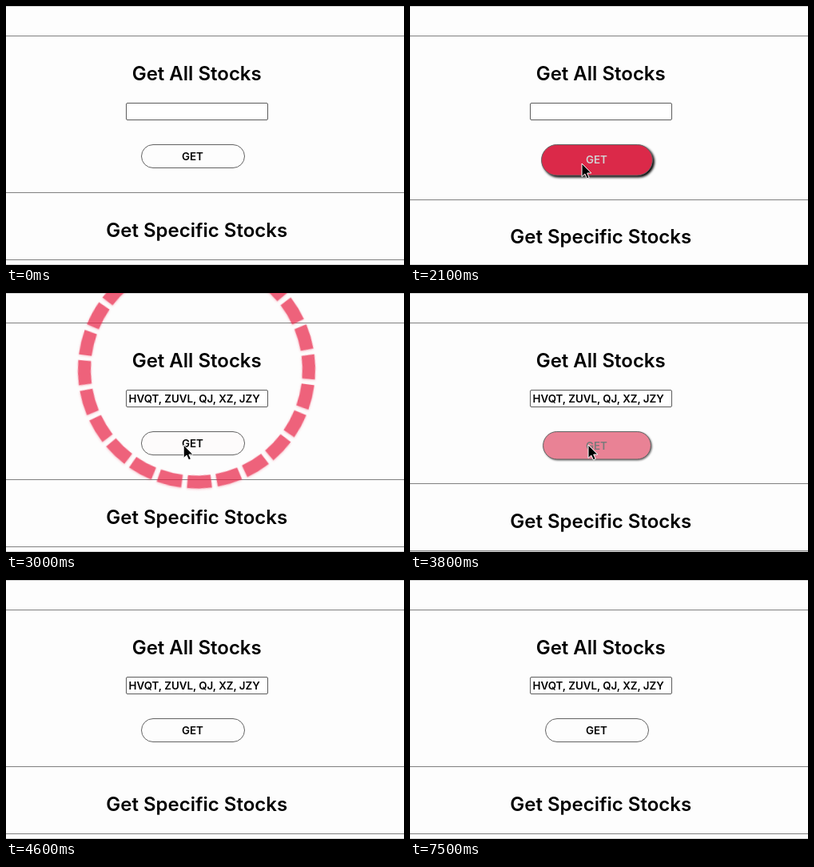
These frames come from a looping animation (498 px wide and 324 px high, 8 s). An HTML page:

```html
<!DOCTYPE html>
<html lang="en">
<head>
<meta charset="utf-8">
<title>Get stocks</title>
<style>
  html, body { margin: 0; width: 100%; height: 100%; overflow: hidden; background: #fdfdfd; }
  svg { display: block; width: 498px; height: 324px; --p: 0; }
  text { font: 600 13.33px Inter, "Open Sans", sans-serif; }
  .title { font-size: 24px; text-anchor: middle; }
  .edge { fill: #d2d2d2; }
  .rule { fill: #808080; shape-rendering: crispEdges; }
  .field { fill: #fff; stroke: #5c5c5c; }
  .below { transform: translateY(calc(var(--p) * 9px)); }
  .button {
    x: calc(169.5px - var(--p) * 5px);
    y: 173.5px;
    width: calc(129px + var(--p) * 10px);
    height: calc(29px + var(--p) * 9.5px);
    rx: calc(14.5px + var(--p) * 4.75px);
    stroke: #626262;
    fill: color-mix(in srgb, #db2848 calc(var(--p) * 100%), #fdfdfd);
    filter: drop-shadow(calc(var(--p) * 3px) calc(var(--p) * 3px) calc(var(--p) * 1.5px) rgb(0 0 0 / var(--p)));
  }
  .label {
    text-anchor: middle;
    fill: color-mix(in srgb, #d3d3d3 calc(var(--p) * 100%), #000);
    transform: translateY(calc(var(--p) * 4.5px));
  }
  #loader { fill: none; stroke: #e92246; stroke-width: 16; filter: drop-shadow(0 1px 1.5px #e9224666); }
</style>
</head>
<body>
<svg id="stage" viewBox="0 0 498 324">
  <rect class="edge" width="498" height="1"/>
  <rect class="rule" y="37" width="498" height="1"/>
  <text class="title" x="238.7" y="92.5">Get All Stocks</text>
  <rect class="field" x="150.5" y="121.5" width="177" height="21" rx="1.5"/>
  <text id="symbols" x="153.5" y="137">HVQT, ZUVL, QJ, XZ, JZY</text>
  <rect class="button"/>
  <text class="label" x="233.5" y="193">GET</text>
  <rect class="edge" y="323" width="498" height="1"/>
  <g class="below">
    <rect class="rule" y="233" width="498" height="1"/>
    <text class="title" x="238.7" y="288.5">Get Specific Stocks</text>
    <rect class="rule" y="317" width="498" height="1"/>
  </g>
  <circle id="loader" cx="238.5" cy="96" r="140.5" pathLength="24" stroke-dasharray=".81 .19"/>
  <path id="cursor" d="M0 0V16.5L3.8 13L6.4 18.8L9.2 17.6L6.7 12H11.8Z"
    fill="#000" stroke="#fff" stroke-width="1"/>
</svg>
<script>
  const LOOP = 8000, STEP = 100, FADE = 300, SPIN = 3000;
  const [stage, symbols, loader, cursor] =
    ["stage", "symbols", "loader", "cursor"].map(id => document.getElementById(id));

  // [time, x, y] along each visit of the pointer
  const path = [
    [1900, 197, 199], [2100, 215, 197], [2400, 221, 191], [2800, 222, 190],
    [3800, 223, 190], [4200, 225, 196], [4300, 230, 214], [4400, 237, 252], [4500, 243, 298], [4600, 248, 330]
  ];
  // [pointer enters, pointer leaves]
  const hovers = [[1830, 2740], [3700, 4300]];

  const clamp = v => Math.min(1, Math.max(0, v));

  // The standard "ease" curve: cubic-bezier(.25, .1, .25, 1)
  function ease(x) {
    const bezier = (a, b, u) => 3 * a * u * (1 - u) ** 2 + 3 * b * u * u * (1 - u) + u ** 3;
    let lo = 0, hi = 1;
    for (let i = 0; i < 20; i++) {
      const mid = (lo + hi) / 2;
      if (bezier(.25, .25, mid) < x) lo = mid; else hi = mid;
    }
    return x <= 0 ? 0 : x >= 1 ? 1 : bezier(.1, 1, lo);
  }

  const hoverAt = t => hovers.reduce((sum, [enter, leave]) =>
    sum + ease(clamp((t - enter) / FADE)) - ease(clamp((t - leave) / FADE)), 0);

  function pointerAt(t) {
    const i = path.findIndex(([time]) => time > t);
    if (i < 1) return null;
    const [t0, x0, y0] = path[i - 1], [t1, x1, y1] = path[i];
    const k = (t - t0) / (t1 - t0);
    return [x0 + (x1 - x0) * k, y0 + (y1 - y0) * k];
  }

  function draw(now) {
    const t = Math.floor(now % LOOP / STEP) * STEP;
    stage.style.setProperty("--p", hoverAt(t).toFixed(4));
    symbols.style.opacity = t >= 2800 ? 1 : 0;
    loader.style.opacity = t < 3100 ? clamp((t - 2767) / 330) : 0;
    loader.setAttribute("transform", `rotate(${7.5 + (t - 3000) / SPIN * 360} 238.5 96)`);
    const spot = pointerAt(t);
    cursor.style.display = spot ? "" : "none";
    if (spot) cursor.setAttribute("transform", `translate(${spot})`);
  }

  const start = performance.now();
  function tick() {
    draw(performance.now() - start);
    requestAnimationFrame(tick);
  }
  tick();
</script>
</body>
</html>
```
